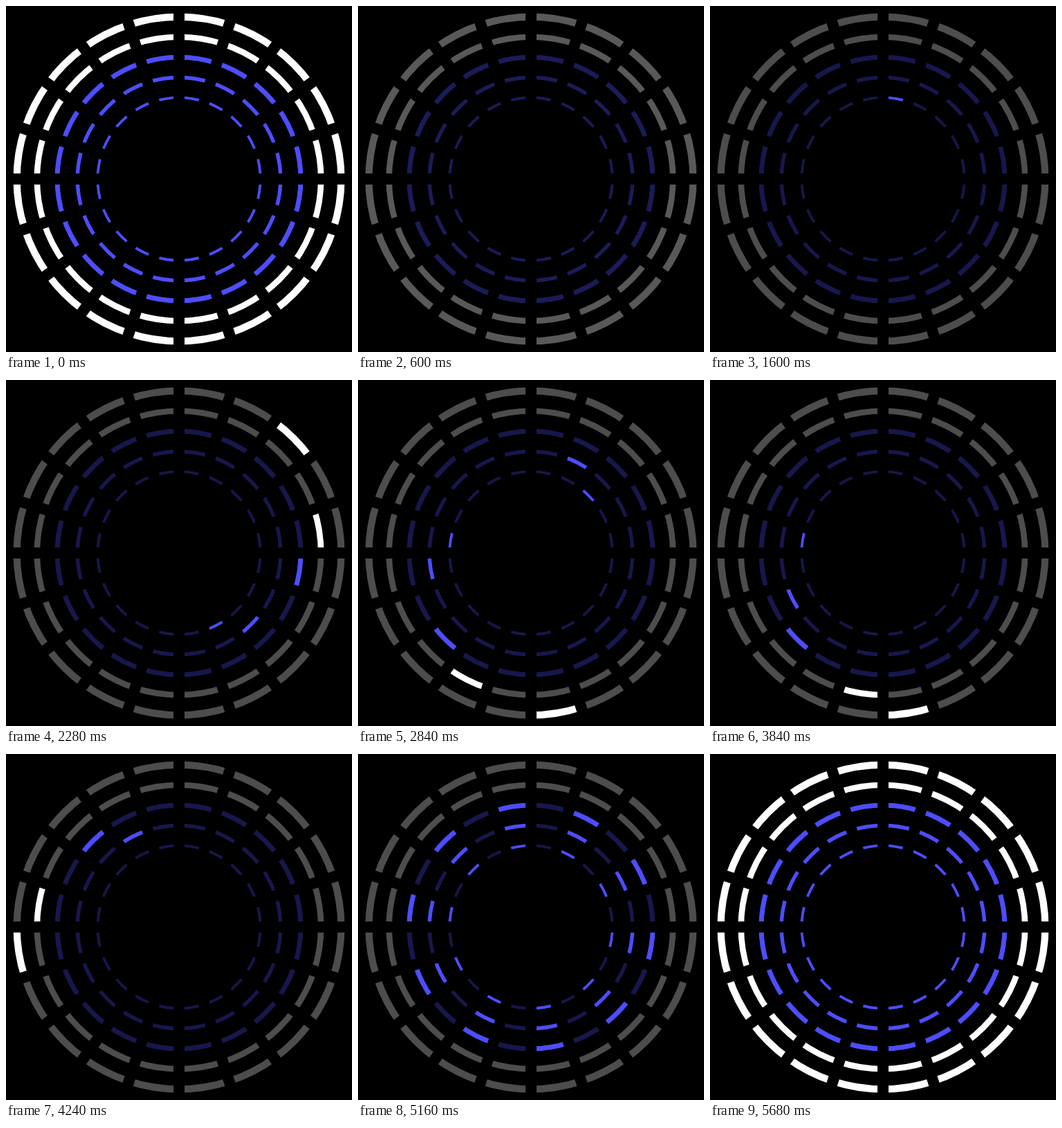
Recreate the animation shown at these times as an HTML page with a canvas. Size 500x500 px, loop 6.04 s.

```html
<!DOCTYPE html>
<html lang="en">
<head>
<meta charset="utf-8">
<title>Ring lights</title>
<style>
  html, body { margin: 0; width: 100%; height: 100%; overflow: hidden; background: #000; }
  canvas { display: block; width: 500px; height: 500px; }
</style>
</head>
<body>
<canvas id="stage" width="500" height="500"></canvas>
<script>
const LOOP = 6040;
const RINGS = 5, SEGMENTS = 20, GAP = 16;
const DIM = 0.3;
const RING_DELAY = 120, STEP = 80;
const FADE = { start: 40, end: 800 };
const CHASES = [1600, 2640];
const ODD_ON = 4920, EVEN_ON = 5200;
const SLICE = 2 * Math.PI / SEGMENTS;

const ctx = document.getElementById("stage").getContext("2d");

// Rings count from the innermost outwards.
const rings = Array.from({ length: RINGS }, (_, i) => {
  const width = 3.8 + 1.6 * i;
  return {
    width,
    radius: 119.5 + 30 * i - width / 2,
    color: i < 3 ? "#4d4dff" : "#fff"
  };
});

function fadeLevel(t) {
  const x = Math.min(1, Math.max(0, (t - FADE.start) / (FADE.end - FADE.start)));
  return DIM + (1 - DIM) * (1 - x) ** 2;
}

function isLit(ring, seg, t) {
  const local = t - ring * RING_DELAY;
  if (local >= (seg % 2 ? ODD_ON : EVEN_ON)) return true;
  return CHASES.some(start => Math.floor((local - start) / STEP) === seg);
}

function drawSpokes() {
  ctx.globalAlpha = 1;
  ctx.strokeStyle = "#000";
  ctx.lineWidth = GAP;
  ctx.beginPath();
  for (let i = 0; i < SEGMENTS; i++) {
    ctx.moveTo(0, 0);
    ctx.lineTo(245 * Math.sin(i * SLICE), -245 * Math.cos(i * SLICE));
  }
  ctx.stroke();
}

function draw(t) {
  ctx.setTransform(1, 0, 0, 1, 250, 250);
  ctx.globalAlpha = 1;
  ctx.fillStyle = "#000";
  ctx.fillRect(-250, -250, 500, 500);
  const base = fadeLevel(t);
  rings.forEach(({ radius, width, color }, ring) => {
    ctx.strokeStyle = color;
    ctx.lineWidth = width;
    for (let seg = 0; seg < SEGMENTS; seg++) {
      const from = seg * SLICE - Math.PI / 2;
      ctx.globalAlpha = isLit(ring, seg, t) ? 1 : base;
      ctx.beginPath();
      ctx.arc(0, 0, radius, from, from + SLICE);
      ctx.stroke();
    }
  });
  drawSpokes();
}

const start = performance.now();
function tick(now) {
  draw(Math.max(0, now - start) % LOOP);
  requestAnimationFrame(tick);
}
draw(0);
requestAnimationFrame(tick);
</script>
</body>
</html>
```
